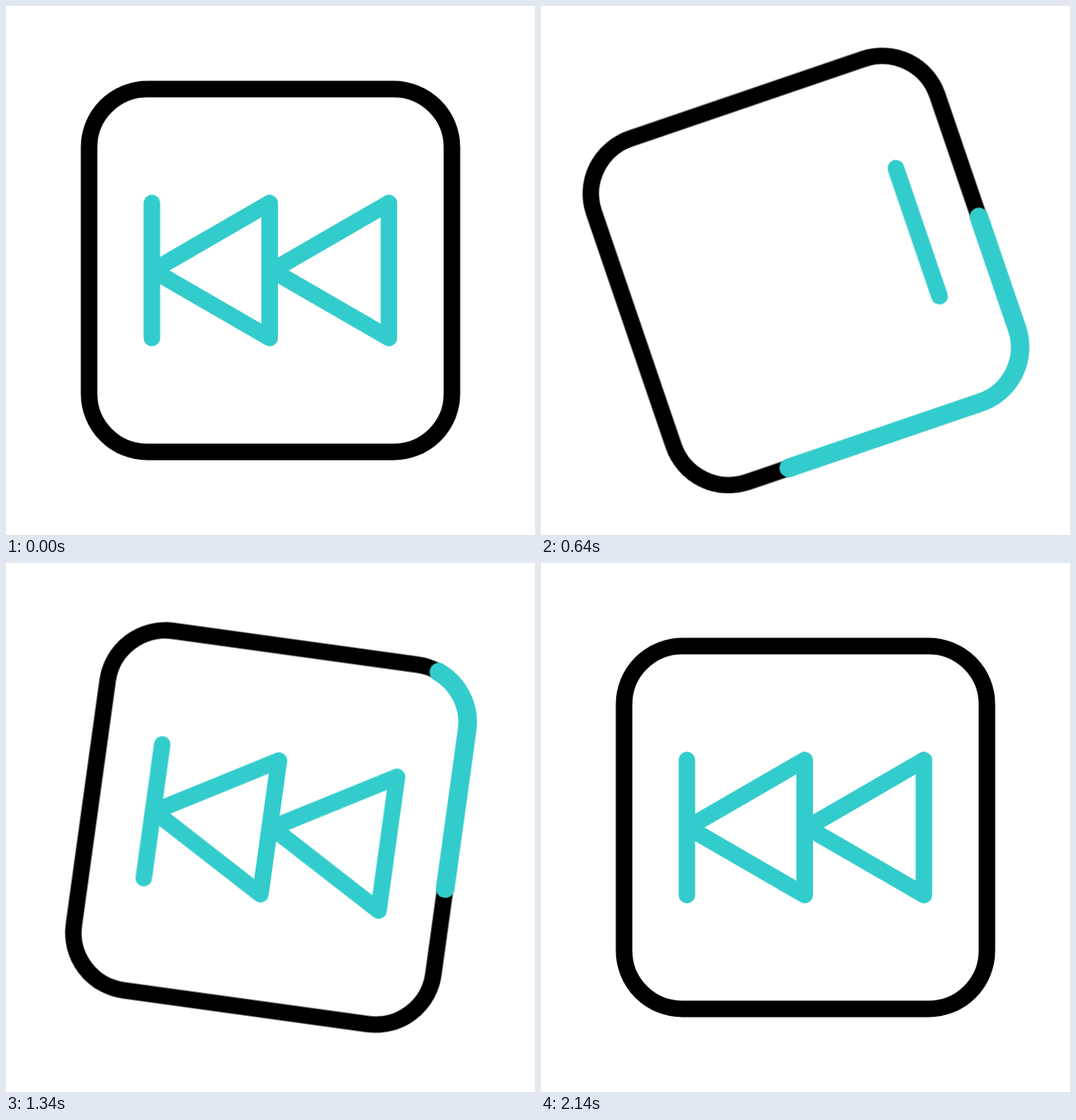
Recreate the animation shown at these times as an HTML page without scripts. Size 640 by 640 pixels, loop 2.72 s.

```html
<!DOCTYPE html>
<html lang="en">
<head>
<meta charset="utf-8">
<title>Rewind button</title>
<style>
  @property --head { syntax: "<number>"; inherits: false; initial-value: 0; }
  @property --tail { syntax: "<number>"; inherits: false; initial-value: 0; }

  html, body { margin: 0; width: 100%; height: 100%; overflow: hidden; background: #fff; }
  svg { display: block; width: 100vw; height: 100vh; }

  .button, .slide, .runner {
    animation: 2720ms cubic-bezier(.333, 0, .667, 1) infinite;
  }
  .button { transform-origin: 320px 320px; animation-name: swing; }
  .slide { animation-name: slide; }

  .frame, .runner, .icon { fill: none; stroke-linecap: round; stroke-linejoin: round; }
  .frame { stroke: #000; stroke-width: 20; }
  .icon { stroke: #33cccc; stroke-width: 20; }
  .runner {
    stroke: #33cccc;
    stroke-width: 22.5;
    stroke-dasharray: calc((var(--head) - var(--tail)) * 1px) 3000px;
    stroke-dashoffset: calc(var(--tail) * -1px);
    animation-name: head, tail, show;
  }

  @keyframes swing {
    0% { transform: rotate(0deg); }
    7.353% { transform: rotate(10deg); }
    25.735% { transform: rotate(-20deg); }
    44.118% { transform: rotate(15deg); }
    58.824% { transform: rotate(-10deg); }
    68.015% { transform: rotate(9.5deg); }
    78.676%, 100% { transform: rotate(0deg); }
  }

  /* the bar wipes the arrows away and back */
  @keyframes slide {
    0%, 4.044% { transform: translateX(0); }
    23.162%, 28.309% { transform: translateX(286.8px); }
    47.426%, 100% { transform: translateX(0); }
  }

  /* three laps around the frame */
  @keyframes head {
    0% { --head: 0; }
    18.86% { --head: 1000; }
    18.861% { --head: 0; }
    31.691%, 43.015% { --head: 1000; }
    43.016% { --head: 0; }
    56.471%, 100% { --head: 1000; }
  }
  @keyframes tail {
    0%, 6.581% { --tail: 0; }
    18.86% { --tail: 1000; }
    18.861%, 28.86% { --tail: 0; }
    43.015% { --tail: 1000; }
    43.016%, 45.441% { --tail: 0; }
    56.471%, 100% { --tail: 1000; }
  }
  @keyframes show {
    0%, .3% { opacity: 0; }
    .301%, 56.4% { opacity: 1; }
    56.401%, 100% { opacity: 0; }
  }
</style>
</head>
<body>
<svg viewBox="0 0 640 640">
  <defs>
    <clipPath id="wipe">
      <rect class="slide" x="176.5" y="200" width="500" height="240"/>
    </clipPath>
  </defs>
  <g class="button">
    <rect class="frame" x="100.5" y="100.5" width="439" height="439" rx="70.5"/>
    <path class="runner" pathLength="1000" d="M223.7 539.5H469A70.5 70.5 0 0 0 539.5 469V171A70.5 70.5 0 0 0 469 100.5H171A70.5 70.5 0 0 0 100.5 171V469A70.5 70.5 0 0 0 171 539.5H223.7"/>
    <g class="icon">
      <g clip-path="url(#wipe)">
        <path d="M319 238.3V401.7L177.7 320Z"/>
        <path d="M463.3 238.3V401.7L322 320Z"/>
      </g>
      <path class="slide" d="M176.5 238.3V401.7"/>
    </g>
  </g>
</svg>
</body>
</html>
```
